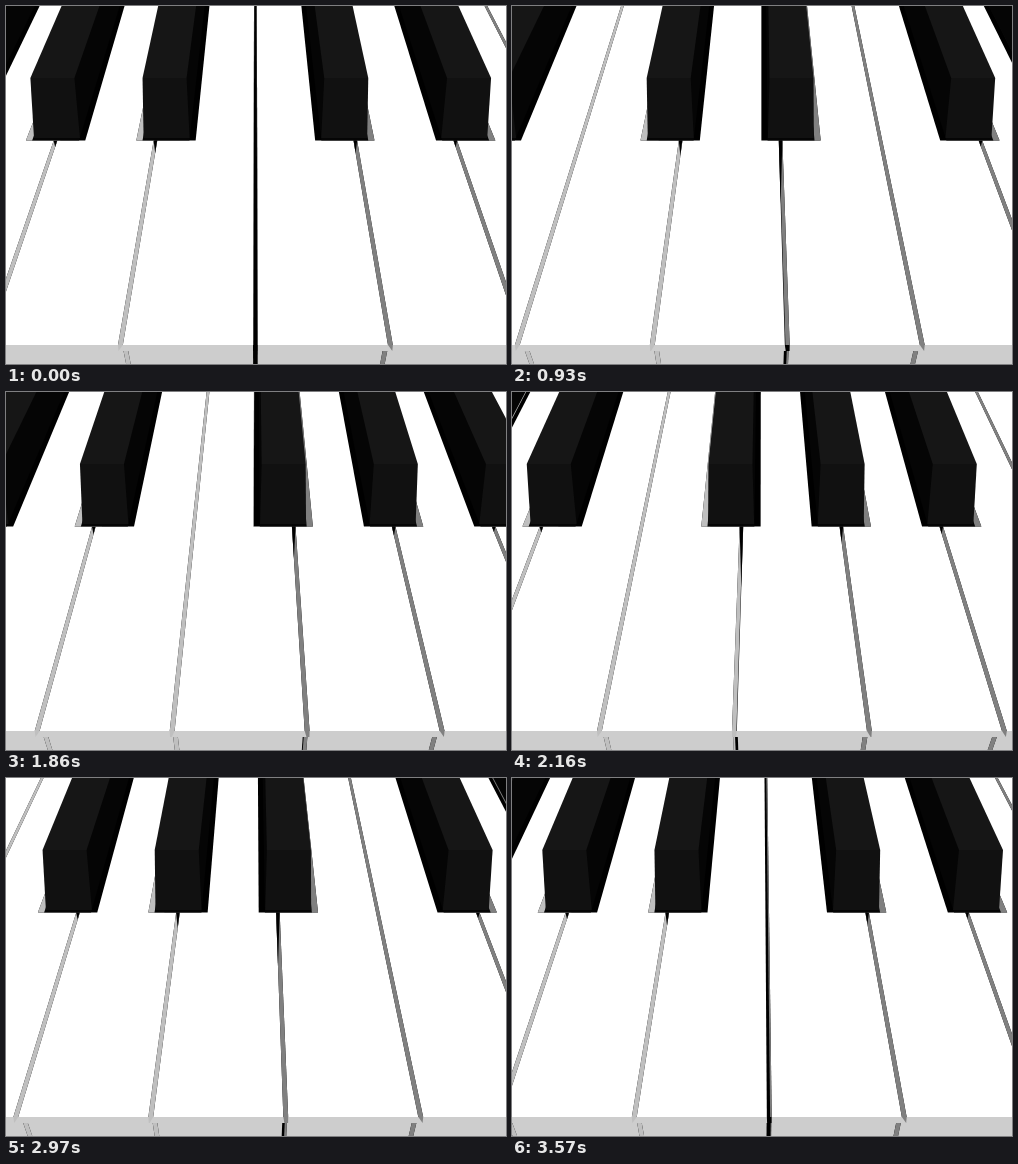
An HTML page with a canvas for the animation above (3600 ms loop, 500 by 358 pixels).

```html
<!DOCTYPE html>
<html lang="en">
<head>
<meta charset="utf-8">
<title>Piano keys</title>
<style>
html, body { margin: 0; width: 100%; height: 100%; overflow: hidden; background: #fff; }
canvas { display: block; }
</style>
</head>
<body>
<canvas id="stage" width="500" height="358"></canvas>
<script>
const ctx = document.getElementById('stage').getContext('2d');

const LOOP = 3600, STEP = 30, OCTAVE = 7;
const CX = 249.4, HORIZON = -448;
const BACK = 134.5, FRONT = 339, BOTTOM = 358;
const HALF_GAP = 0.018, HALF_HOLE = 0.297, FLOOR = 0.85;
const LIGHT = '#bfbfbf', DARK = '#808080';

// Black key offset from each white key boundary, null where there is none
const BLACK = [null, -0.105, 0.105, null, -0.105, 0, 0.105];

// Pixels per white key at screen height y: on the white surface, on the black tops
const surface = y => 100 * (y - HORIZON) / (135 - HORIZON);
const raised = y => 101.5 * (y - HORIZON) / (72 - HORIZON);

// Polygon from x, y pairs, with x relative to the centre line
function poly(color, ...p) {
  ctx.fillStyle = color;
  ctx.beginPath();
  for (let i = 0; i < p.length; i += 2) ctx.lineTo(CX + p[i], p[i + 1]);
  ctx.fill();
}

function band(color, a, b, y0, y1, k0, k1) {
  poly(color, a * k0, y0, b * k0, y0, b * k1, y1, a * k1, y1);
}

// Opening between a and b in the white surface, with its visible walls
function slot(a, b, y0, y1) {
  const k0 = surface(y0), k1 = surface(y1);
  band('#000', a, b, y0, y1, k0, k1);
  if (a < 0) band(LIGHT, a, Math.min(b, a * FLOOR), y0, y1, k0, k1);
  if (b > 0) band(DARK, Math.max(a, b * FLOOR), b, y0, y1, k0, k1);
}

function gap(u, hasBlack) {
  slot(u - HALF_GAP, u + HALF_GAP, hasBlack ? BACK : 0, FRONT);

  const side = u < 0 ? -1 : 1, v = Math.abs(u);
  const inner = v - HALF_GAP, outer = v + HALF_GAP;
  const wall = side < 0 ? LIGHT : DARK;
  const shape = (color, ...p) => poly(color, ...p.map((n, i) => i % 2 ? n : n * side));

  if (hasBlack) {
    const drop = Math.min(FRONT - 135, 3.6 / (0.13 * outer + 0.1716 * Math.abs(inner)));
    shape('#000', inner * 100, BACK, outer * 100, BACK,
      inner * surface(135 + drop), 135 + drop);
  }

  // Lip of the key front
  const tip = outer * 134.5;
  shape(v < 0.2 ? '#000' : wall, inner * 135, FRONT, outer * 135, FRONT,
    tip, 345, Math.min(tip, inner * 134.5 + 5 * v), 345);

  // Recessed front below the lip
  const lit = Math.min(2 * HALF_GAP * 128, 9.5 * v);
  const o0 = outer * 129.5, o1 = outer * 127;
  shape('#000', inner * 129.5, 345, o0, 345, o1, BOTTOM, inner * 127, BOTTOM);
  shape(wall, o0 - lit, 345, o0, 345, o1, BOTTOM, o1 - lit, BOTTOM);
}

function blackKey(u) {
  band('#050505', u - 0.235, u + 0.235, 0, BACK, surface(0), surface(BACK));
  band('#161616', u - 0.217, u + 0.217, 0, 72, raised(0), raised(72));
  poly('#111', (u - 0.217) * 101.5, 72, (u + 0.217) * 101.5, 72,
    (u + 0.232) * 99.2, 132, (u - 0.232) * 99.2, 132);
}

function draw(ms) {
  const scroll = Math.floor(ms % LOOP / STEP) * STEP / LOOP * OCTAVE;
  const blacks = [];

  ctx.fillStyle = '#fff';
  ctx.fillRect(0, 0, 500, 358);
  ctx.fillStyle = '#cdcdcd';
  ctx.fillRect(0, FRONT, 500, BOTTOM - FRONT);

  const first = Math.floor(scroll) - 5;
  for (let n = first; n <= first + 11; n++) {
    const u = n - scroll;
    const shift = BLACK[(n + 2 * OCTAVE) % OCTAVE];
    gap(u, shift !== null);
    if (shift !== null) blacks.push(u + shift);
  }
  blacks.forEach(u => slot(u - HALF_HOLE, u + HALF_HOLE, 0, BACK));
  blacks.forEach(blackKey);
}

const start = performance.now();
function tick() {
  draw(performance.now() - start);
  requestAnimationFrame(tick);
}
tick();
</script>
</body>
</html>
```
